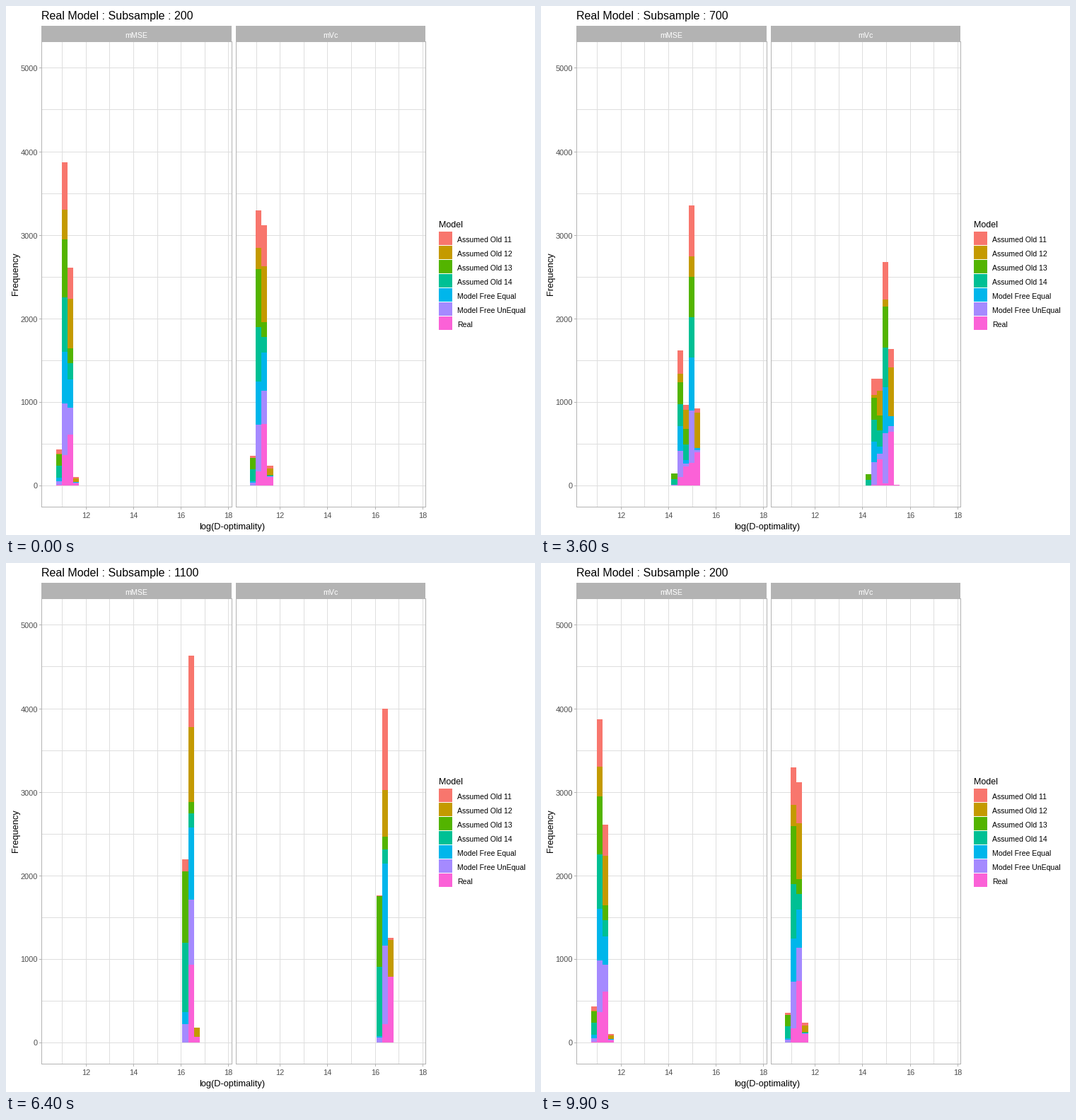
Write a matplotlib script that moves like this. It is 748x748 px and loops after 10 s.

```python
import math
import numpy as np
import matplotlib.pyplot as plt
from matplotlib.animation import FuncAnimation
from matplotlib.collections import PolyCollection
from matplotlib.patches import Rectangle

SIZE, DPI = 748, 88
plt.rcParams["font.family"] = "Liberation Sans"

# Stacking order, bottom to top: colour, mean bin in each panel, spread
MODELS = {
    "Real": ("#FB61D7", (23.63, 24.09), 0.28),
    "Model Free UnEqual": ("#A58AFF", (23.02, 23.20), 0.30),
    "Model Free Equal": ("#00B6EB", (23.08, 23.30), 0.29),
    "Assumed Old 14": ("#00C094", (22.62, 22.62), 0.335),
    "Assumed Old 13": ("#53B400", (22.61, 22.62), 0.31),
    "Assumed Old 12": ("#C49A00", (23.66, 23.90), 0.305),
    "Assumed Old 11": ("#F8766D", (23.11, 23.43), 0.33),
}
SAMPLES = range(200, 1600, 100)
BINS, BIN_W = 30, 8.12
BIN_X = (62.65, 336.92)
BASE_Y, Y_SCALE = 678, 0.1182

# First frame and number of steps of each transition
START = [4, 12, 20, 28, 35, 42, 49, 55, 62, 69, 76, 83, 90, 97]
STEPS = [4] * 3 + [3] * 3 + [2] + [3] * 7


def histogram(n, mean, spread):
    """Bin 1000 normal values; the mean grows with log(n), less a bias."""
    bias = 20 + 80 * (mean - 22.62)
    mu = mean + 12.41 * math.log(n / 1000) - bias / n
    sd = spread * math.sqrt(500 / n)
    cdf = [0.5 + 0.5 * math.erf((b - mu) / sd / math.sqrt(2))
           for b in range(BINS + 1)]
    return 1000 * np.diff(cdf)


# Axes: sample, panel, model, bin
counts = np.array([[[histogram(n, means[p], spread)
                     for _, means, spread in MODELS.values()]
                    for p in range(2)] for n in SAMPLES])

fig = plt.figure(figsize=(SIZE / DPI, SIZE / DPI), dpi=DPI, facecolor="white")
ax = fig.add_axes([0, 0, 1, 1])
ax.set_xlim(0, SIZE)
ax.set_ylim(SIZE, 0)
ax.axis("off")


def box(x, y, w, h, color, z=1):
    ax.add_patch(Rectangle((x, y), w, h, fc=color, ec="none", lw=0,
                           antialiased=False, zorder=z))


def label(x, y, s, px, color="black", **kw):
    return ax.text(x, y, s, fontsize=px * 72 / DPI, color=color,
                   va="baseline", zorder=5, **kw)


GRID, EDGE, TICK_TEXT = "#DEDEDE", "#B3B3B3", "#4D4D4D"
TOP, BOTTOM = 50, 708


def grid_y(v):
    return round(678.4 - v * Y_SCALE)


def draw_panel(name, left, right, x12):
    width = right - left
    box(left, 28, width, 22, EDGE)
    label((left + right) / 2, 44.5, name, 10.6, "white", ha="center")
    for v in range(11, 19):
        x = round(x12 + (v - 12) * 33.6)
        box(x, TOP, 1, BOTTOM - TOP, GRID)
        if v % 2 == 0:
            box(x, BOTTOM + 1, 1, 3, EDGE)
            label(x + 0.5, 724, str(v), 11, TICK_TEXT, ha="center")
    for v in range(0, 5500, 500):
        box(left, grid_y(v), width, 1, GRID)
    for x in (left, right):
        box(x, TOP, 1, BOTTOM - TOP + 1, EDGE, 4)
    for y in (TOP, BOTTOM):
        box(left, y, width + 1, 1, EDGE, 4)


draw_panel("mMSE", 50, 319, 112.75)
draw_panel("mVc", 325, 593, 387.25)

for v in range(0, 6000, 1000):
    box(47, grid_y(v), 3, 1, EDGE)
    label(45, grid_y(v) + 4.5, str(v), 11, TICK_TEXT, ha="right")

label(320, 740, "log(D-optimality)", 12.7, ha="center")
label(17.5, 378.5, "Frequency", 12.9, ha="center", rotation=90,
      rotation_mode="anchor")
label(612, 313, "Model", 12.5)
title = label(50, 18.7, "", 16)

layers = []
for i, (name, (color, _, _)) in enumerate(MODELS.items()):
    y = 439 - 20 * i
    box(612, y, 19, 19, color)
    label(638, y + 15, name, 10.55)
    layer = PolyCollection([], facecolors=color, edgecolors="none",
                           linewidths=0, antialiaseds=False, zorder=3)
    ax.add_collection(layer, autolim=False)
    layers.append(layer)


def progress(frame):
    """Return the state left, the state entered and the share of the way."""
    k = sum(s <= frame for s in START) - 1
    if k < 0:
        return 0, 0, 0.0
    step = frame - START[k] + 1
    t = 1.0 if step >= STEPS[k] else step / max(3, STEPS[k])
    return k, (k + 1) % len(SAMPLES), t


def update(frame):
    a, b, t = progress(frame)
    tops = np.cumsum((1 - t) * counts[a] + t * counts[b], axis=1)
    ys = np.round(BASE_Y - Y_SCALE * tops)
    for m, layer in enumerate(layers):
        bars = []
        for p, x0 in enumerate(BIN_X):
            edges = np.round(x0 + BIN_W * np.arange(BINS + 1))
            lows = ys[p, m - 1] if m else np.full(BINS, BASE_Y)
            for l, r, y0, y1 in zip(edges, edges[1:], lows, ys[p, m]):
                if y1 < y0:
                    bars.append([(l, y0), (l, y1), (r, y1), (r, y0)])
        layer.set_verts(bars)
    title.set_text(f"Real Model : Subsample : {SAMPLES[b if t > 0.5 else a]}")
    return [*layers, title]


anim = FuncAnimation(fig, update, frames=100, interval=100, repeat=True,
                     repeat_delay=0, blit=False)
plt.show()
```
